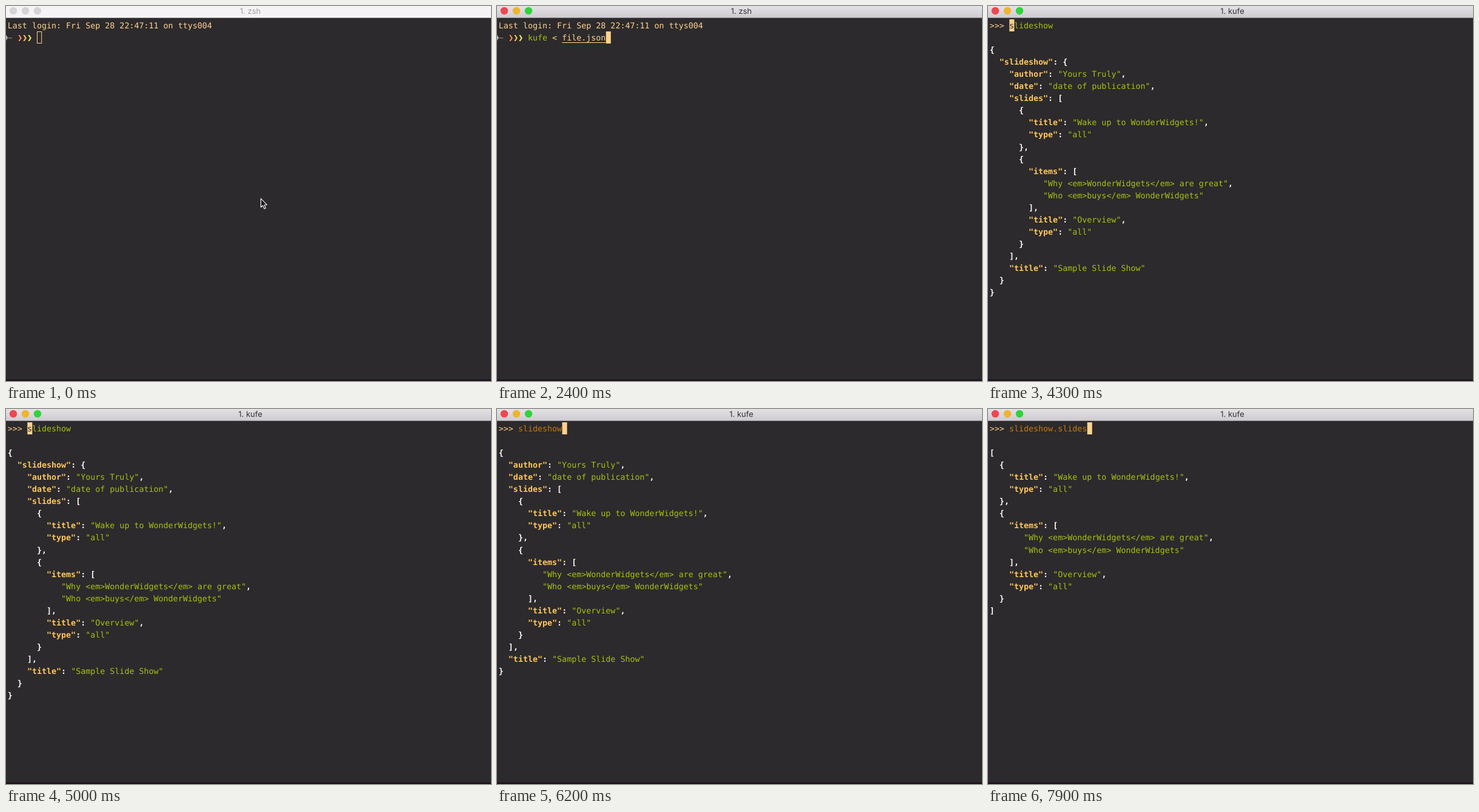
Recreate the animation shown at these times as an HTML page. Size 800 by 620 pixels, loop 8 s.

```html
<!DOCTYPE html>
<html lang="en">
<head>
<meta charset="utf-8">
<title>Terminal</title>
<style>
  html, body { margin: 0; width: 100%; height: 100%; overflow: hidden; background: #2c2a2c; }
  svg { display: block; }
  text { font: 13.33px "DejaVu Sans Mono", monospace; text-rendering: geometricPrecision; white-space: pre; }
  text.bold { font-weight: bold; }
  text.title { font: 13px Inter, sans-serif; text-anchor: middle; }
</style>
</head>
<body>
<svg id="stage" width="800" height="620" viewBox="0 0 800 620">
  <defs>
    <linearGradient id="bar" x1="0" y1="0" x2="0" y2="1">
      <stop offset="0" stop-color="#e5e2e6"/>
      <stop offset="1" stop-color="#cdcad0"/>
    </linearGradient>
  </defs>
  <rect width="800" height="620" fill="#2c2a2c"/>
  <rect y="617.5" width="800" height="2.5" fill="#1a111a"/>
</svg>
<script>
const LOOP = 8000;
const CELL = 8.025, LINE = 20.05, LEFT = 2.8;
const BG = '#2c2a2c', SAND = '#ffd28f', GREEN = '#a5c212', GOLD = '#ffc75c',
      WHITE = '#fbf9f6', ORANGE = '#c8780c', RED = '#ff6264', HINT = '#a9d3a3';
const APP = 'kufe', ARGS = ' < file.json';

const doc = {
  slideshow: {
    author: 'Yours Truly',
    date: 'date of publication',
    slides: [
      { title: 'Wake up to WonderWidgets!', type: 'all' },
      {
        items: ['Why <em>WonderWidgets</em> are great', 'Who <em>buys</em> WonderWidgets'],
        title: 'Overview',
        type: 'all'
      }
    ],
    title: 'Sample Slide Show'
  }
};

const stage = document.getElementById('stage');

function add(parent, tag, attrs, content) {
  const el = document.createElementNS('http://www.w3.org/2000/svg', tag);
  for (const k in attrs) el.setAttribute(k, attrs[k]);
  if (content !== undefined) el.textContent = content;
  parent.appendChild(el);
  return el;
}

const colX = col => LEFT + col * CELL;

// Writes text on the character grid and returns the next column.
function write(g, row, col, str, fill, bold) {
  if (str) add(g, 'text', { x: colX(col), y: 37 + row * LINE, fill, class: bold ? 'bold' : '' }, str);
  return col + str.length;
}

function block(g, row, col, fill, char) {
  add(g, 'rect', { x: colX(col) + 0.4, y: 22 + row * LINE, width: CELL, height: 20, fill });
  return write(g, row, col, char || ' ', BG);
}

function printJson(g, root) {
  let row = 2, col = 0;
  const put = (s, fill, bold) => { col = write(g, row, col, s, fill, bold); };
  const value = (v, depth) => {
    if (typeof v === 'string') return put(`"${v}"`, GREEN);
    const list = Array.isArray(v), keys = Object.keys(v);
    put(list ? '[' : '{', WHITE, true);
    keys.forEach((k, i) => {
      row++;
      col = depth + (typeof v[k] === 'string' && list ? 3 : 2);
      if (!list) {
        put(`"${k}"`, GOLD, true);
        put(':', WHITE, true);
        col++;
      }
      value(v[k], depth + 2);
      if (i < keys.length - 1) put(',', WHITE, true);
    });
    row++;
    col = depth;
    put(list ? ']' : '}', WHITE, true);
  };
  value(root, 0);
}

function frame(g, title, focused) {
  add(g, 'rect', { width: 800, height: 19.5, fill: focused ? 'url(#bar)' : '#f5f3f6' });
  add(g, 'rect', { y: 19, width: 800, height: 1, fill: focused ? '#8b888d' : '#a9a7aa' });
  ['#ee4750', '#eeb430', '#30d33e'].forEach((c, i) =>
    add(g, 'circle', { cx: 12 + 20 * i, cy: 8, r: 6.2, fill: focused ? c : '#d5d3d6' }));
  add(g, 'text', { x: 403, y: 13, class: 'title', fill: focused ? '#353336' : '#a09ea1' }, '1. ' + title);
}

function pointer(g) {
  add(g, 'path', {
    d: 'M420.4 318.4V332.8L423.6 329.8 426 335.2 428.4 334.2 426.1 329 430.3 328.7Z',
    fill: '#161516', stroke: '#f4f4f4', 'stroke-width': 1.2, 'stroke-linejoin': 'round'
  });
}

// Shell prompt; typed is the number of characters entered so far.
function shell(typed, { focused = true, mouse = false } = {}) {
  return g => {
    const line = APP + ARGS;
    frame(g, 'zsh', focused);
    write(g, 0, 0, 'Last login: Fri Sep 28 22:47:11 on ttys004', SAND);
    add(g, 'path', { d: 'M0 47.5L3 52.5 0 57.5Z', fill: '#aeb4bc' });
    write(g, 1, 0, '~', '#b98a4a');
    ['#fb8a5c', '#fbc060', '#f3ee62'].forEach((fill, i) =>
      add(g, 'path', { d: `M${20.3 + 8 * i} 48h2.4l3.2 5-3.2 5h-2.4l3.2-5z`, fill }));
    if (!focused) {
      add(g, 'rect', { x: 51.5, y: 42.5, width: 7.2, height: 19, fill: 'none', stroke: SAND });
    } else if (typed === 0) {
      block(g, 1, 6, SAND);
    } else if (typed < line.length) {
      let col = write(g, 1, 6, line.slice(0, typed), RED, true);
      col = block(g, 1, col, HINT, line[typed]);
      write(g, 1, col, line.slice(typed + 1), HINT);
    } else {
      write(g, 1, 6, APP, GREEN);
      write(g, 1, 11, '<', SAND);
      write(g, 1, 13, 'file.json', SAND);
      add(g, 'rect', { x: colX(13), y: 60, width: 9 * CELL, height: 1, fill: SAND });
      block(g, 1, 22, SAND);
    }
    if (mouse) pointer(g);
  };
}

// Query prompt with its completion hint, above the selected data.
function query(typed, hint, data) {
  return g => {
    frame(g, APP, true);
    write(g, 0, 0, '>>>', SAND);
    let col = write(g, 0, 4, typed, ORANGE);
    col = block(g, 0, col, SAND, hint[0]);
    write(g, 0, col, hint.slice(1), GREEN);
    printJson(g, data);
  };
}

const show = doc.slideshow;
const scenes = [
  [0, shell(0, { focused: false, mouse: true })],
  [100, shell(0, { mouse: true })],
  [800, shell(1)],
  [1000, shell(2)],
  [1500, shell(16)],
  [4000, query('', 'slideshow', doc)],
  [5700, query('s', 'lideshow', doc)],
  [6200, query('slideshow', '', show)],
  [6500, query('slideshow.', 'author', show)],
  [7100, query('slideshow.s', 'lides', show)],
  [7800, query('slideshow.slides', '', show.slides)]
].map(([at, draw]) => {
  const g = add(stage, 'g', { display: 'none' });
  draw(g);
  return { at, g };
});

let current = null;
function tick() {
  const t = performance.now() % LOOP;
  const next = scenes.filter(s => s.at <= t).pop();
  if (next !== current) {
    if (current) current.g.setAttribute('display', 'none');
    next.g.removeAttribute('display');
    current = next;
  }
  requestAnimationFrame(tick);
}
tick();
</script>
</body>
</html>
```
